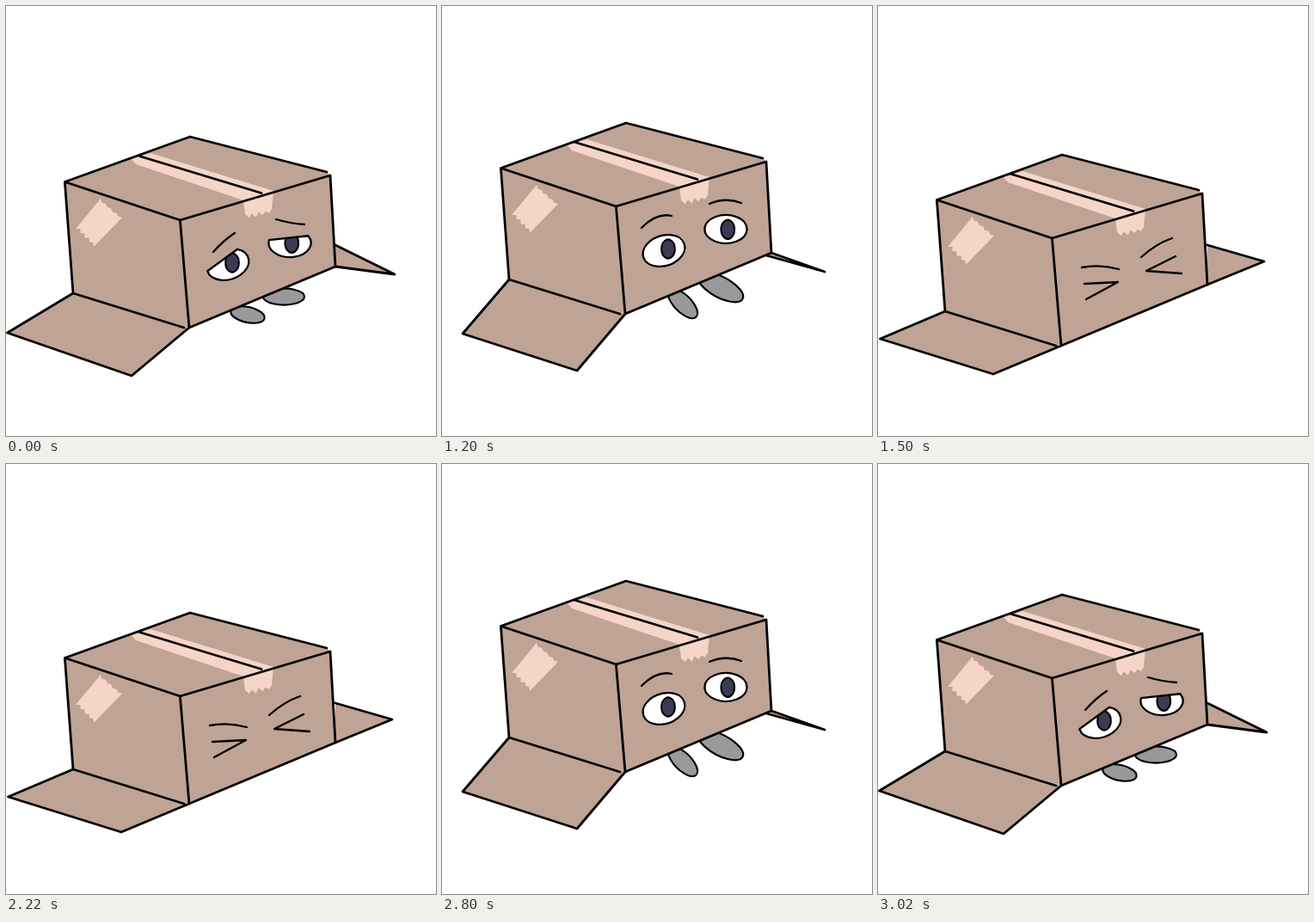
An HTML page that plays this animation: 500x500 px, repeating every 3100 ms.

```html
<!DOCTYPE html>
<html lang="en">
<head>
<meta charset="utf-8">
<title>Shy box</title>
<style>
html, body { margin: 0; width: 100%; height: 100%; overflow: hidden; background: #fff; }
svg { display: block; width: 500px; height: 500px; }
path { fill: none; stroke: #000; stroke-width: 2.3; stroke-linecap: round; stroke-linejoin: round; }
.card { fill: #bfa395; stroke-width: 2.8; }
.edge { stroke-width: 2.8; }
.foot { fill: #999; stroke-width: 2.1; }
.pupil { fill: #3b3b56; stroke-width: 2.1; }
.flat { fill: #bfa395; stroke: none; }
.tape { fill: #f5d5c8; stroke: none; }
.white { fill: #fff; stroke: none; }
</style>
</head>
<body>
<svg viewBox="0 0 500 500">
  <defs>
    <clipPath id="clipL"><path id="holeL"/></clipPath>
    <clipPath id="clipR"><path id="holeR"/></clipPath>
  </defs>
  <path id="flapL" class="card"/>
  <path id="flapR" class="card"/>
  <path id="footL" class="foot"/>
  <path id="footR" class="foot"/>
  <g id="box">
    <path id="sides" class="flat"/>
    <path id="strip" class="tape"/>
    <path id="patch" class="tape"/>
    <path id="edges" class="edge"/>
    <path id="brows"/>
    <g id="eyes">
      <path id="whiteL" class="white"/>
      <path id="whiteR" class="white"/>
      <g clip-path="url(#clipL)"><path id="pupilL" class="pupil"/></g>
      <g clip-path="url(#clipR)"><path id="pupilR" class="pupil"/></g>
      <path id="rimL"/>
      <path id="rimR"/>
    </g>
    <path id="squint" d="M240 302L279 300L242 320M346 270L312 287L353 290"/>
  </g>
</svg>
<script>
const $ = id => document.getElementById(id);
const draw = (id, d) => $(id).setAttribute('d', d);
const line = (...points) => 'M' + points.join('L');

// Ellipse, or the part of it between two angles closed by a straight chord
function oval(x, y, rx, ry, tilt = 0, from = 0, to = 359.9) {
  const rad = Math.PI / 180, c = Math.cos(tilt * rad), s = Math.sin(tilt * rad);
  const at = deg => {
    const u = rx * Math.cos(deg * rad), v = ry * Math.sin(deg * rad);
    return [x + u * c - v * s, y + u * s + v * c];
  };
  return `M${at(from)}A${rx} ${ry} ${tilt} 1 1 ${at(to)}Z`;
}

// Arched line from a to b
function bow(a, b, rise) {
  return `M${a}Q${(a[0] + b[0]) / 2} ${(a[1] + b[1]) / 2 - rise} ${b}`;
}

let seed = 7;
const random = () => (seed = seed * 16807 % 2147483647) / 2147483647;

// Torn tape end from a to b, teeth to one side
function tear(a, b, teeth, depth) {
  const dx = b[0] - a[0], dy = b[1] - a[1], len = Math.hypot(dx, dy);
  const points = [a];
  for (let i = 1; i < teeth * 2; i++) {
    const t = i / (teeth * 2), d = i % 2 ? depth * (0.6 + 0.4 * random()) : depth * 0.2 * random();
    points.push([a[0] + dx * t + dy / len * d, a[1] + dy * t - dx / len * d]);
  }
  return [...points, b];
}

const back = [214, 152], left = [68.4, 204.5], front = [202.4, 249], right = [377, 197];
const lowLeft = [78, 334], lowFront = [213, 374], lowRight = [383, 303];
const brink = [373, 193];

draw('sides', line(left, back, brink, right, lowRight, lowFront, lowLeft));
draw('edges', line(brink, back, left, front, right, lowRight, lowFront, front) +
  line(left, lowLeft, [207, 374]) + line([155, 174.5], [297, 217.5]));
draw('strip', line([146, 178], [168, 171], [311, 215], ...tear([309, 236], [278, 242], 4, 7), [276, 226], [151, 184]));
draw('patch', line(...tear([110, 224], [135, 246], 4, -3), ...tear([102, 280], [81, 259], 4, -4)));

const eyes = {
  L: { x: 258, y: 300.5, rx: 25, ry: 17.5, tilt: -18, look: [5, -2], lid: [-50, 180] },
  R: { x: 330, y: 275.5, rx: 24.6, ry: 16.5, tilt: 0, look: [2.3, 0.3], lid: [-30, 192] }
};

const half = { lift: 0, tips: [[1.5, 380], [146, 430]], wing: [[383, 278], [452, 312]] };

const poses = {
  sad: {
    ...half, eye: 'tired',
    feet: [[281, 359, 20, 9, 12], [323, 338, 24, 9.5, 0]],
    brows: bow([241, 286], [266, 264], 3) + bow([314, 248], [347, 254], -2)
  },
  up: {
    lift: -16, eye: 'open',
    tips: [[24, 381], [157, 424]], wing: [[377, 290], [445, 309]],
    feet: [[280, 346, 22, 10, 45], [324, 327, 29, 12, 28]],
    brows: bow([232, 274], [267, 260], 11) + bow([311, 246], [348, 245], 7.5)
  },
  peek: {
    ...half, eye: 'narrow',
    feet: [[272, 353, 18, 8, 5], [314, 335, 16, 8, 5]],
    brows: bow([232, 283], [275, 274], 11) + bow([308, 262], [348, 252], 10)
  },
  down: {
    lift: 21,
    tips: [[2.5, 387], [134, 428]], wing: [[383, 278], [449, 297]],
    brows: bow([237, 283], [280, 285], 5) + bow([306, 271], [342, 249], 5)
  }
};

function drawEye(side, mood) {
  const { x, y, rx, ry, tilt, look, lid } = eyes[side];
  const narrow = mood === 'narrow', cy = narrow ? y + 8 : y;
  const shape = narrow ? oval(x, cy, rx * 0.92, ry * 0.58, tilt)
    : oval(x, y, rx, ry, tilt, ...(mood === 'tired' ? lid : []));
  for (const part of ['hole', 'white', 'rim']) draw(part + side, shape);
  draw('pupil' + side, oval(x + look[0], cy + look[1], 7.8, 11));
}

function show({ lift, eye, tips, wing, feet, brows }) {
  const raise = ([x, y]) => [x, y + lift];
  $('box').setAttribute('transform', `translate(0 ${lift})`);
  $('eyes').style.display = eye ? '' : 'none';
  $('squint').style.display = eye ? 'none' : '';
  draw('flapL', line(raise(lowLeft), ...tips, raise(lowFront)));
  draw('flapR', line(...wing, raise(lowRight)));
  draw('brows', brows);
  ['L', 'R'].forEach((side, i) => {
    draw('foot' + side, feet ? oval(...feet[i]) : '');
    if (eye) drawEye(side, eye);
  });
}

const loop = 3100;
const steps = [[0, 'sad'], [1200, 'up'], [1400, 'peek'], [1500, 'down'],
               [2700, 'peek'], [2800, 'up'], [2900, 'sad']];

let current;
function update(time) {
  const t = time % loop;
  const name = steps.filter(s => s[0] <= t).pop()[1];
  if (name !== current) show(poses[current = name]);
}

const start = performance.now();
function tick(now) {
  update(Math.max(0, now - start));
  requestAnimationFrame(tick);
}
update(0);
requestAnimationFrame(tick);
</script>
</body>
</html>
```
